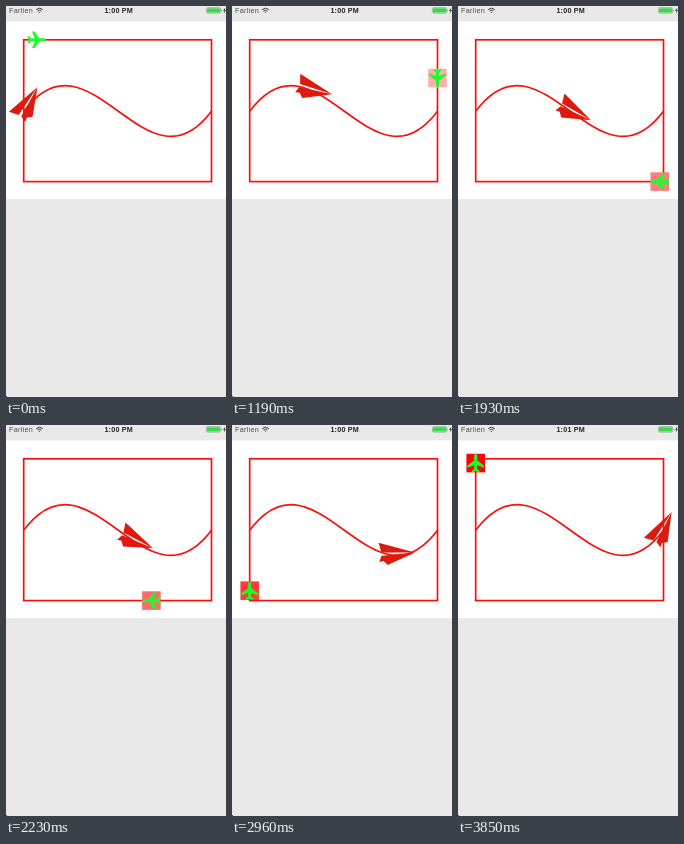
An HTML page for the animation above (3.99 s loop, 220 px wide and 391 px high).

```html
<!DOCTYPE html>
<html lang="en">
<head>
<meta charset="utf-8">
<title>Planes on paths</title>
<style>
html, body { margin: 0; width: 100%; height: 100%; overflow: hidden; background: #e9e9e9; }
svg { display: block; width: 100vw; height: 100vh; }
text { font-family: "Liberation Sans", Arial, sans-serif; font-size: 7.2px; }
</style>
</head>
<body>
<svg viewBox="0 0 220 391">
  <rect width="220" height="391" fill="#e9e9e9"/>
  <rect y="15.5" width="220" height="177.5" fill="#fff"/>

  <text x="3" y="7.1" fill="#4a4a4a" letter-spacing=".3">Farlien</text>
  <g fill="none" stroke="#333" stroke-width="1">
    <path d="M30.2 3.6Q33.5 .8 36.8 3.6M31.6 5.1Q33.5 3.6 35.4 5.1"/>
    <circle cx="33.5" cy="6.4" r=".5" fill="#333" stroke="none"/>
  </g>
  <text id="clock" x="112.7" y="7.1" fill="#222" font-weight="bold" letter-spacing=".2" text-anchor="middle">1:00 PM</text>
  <rect x="200.4" y="1.6" width="14.2" height="5.6" rx="1.4" fill="#e9e9e9" stroke="#62ad6c" stroke-width=".6"/>
  <rect x="201" y="2.2" width="13" height="4.4" rx=".9" fill="#3fd34f"/>
  <path d="M215.2 3.4v2q.9-.2.9-1t-.9-1" fill="#62ad6c"/>
  <path d="M219.3 1.8L217 4.8h1.4L218 7.2l2-3h-1.2z" fill="#333"/>
  <rect y="390" width="1" height="1" fill="#555"/>

  <g fill="none" stroke="#f8100c" stroke-width="1.7">
    <rect id="frame"/>
    <path id="wave"/>
  </g>
  <g id="paper" fill="#dc1b0e">
    <path d="M21.5-4.8L-15.8-11L-12-1.5z"/>
    <path d="M21.5-4.8L-4.5 10.4L-9 6.6L-13.2 8.1L-11.6 1.6z"/>
  </g>
  <g id="jet">
    <rect id="tile" x="-9.3" y="-9.3" width="18.6" height="18.6"/>
    <path fill="#1cfb2b" d="M9.2 0C9.2-1 7.6-1.6 6-1.6H2.5L-2.5-8.3H-4.8L-2.2-1.6L-5.8-1.4L-7.6-3.8H-9.2L-8.2 0L-9.2 3.8H-7.6L-5.8 1.4L-2.2 1.6L-4.8 8.3H-2.5L2.5 1.6H6C7.6 1.6 9.2 1 9.2 0z"/>
  </g>
</svg>
<script>
const el = id => document.getElementById(id);
const box = { x: 17.7, y: 33.8, w: 187.8, h: 141.8 };
const corners = [[0, 0], [1, 0], [1, 1], [0, 1], [0, 0]]
  .map(([u, v]) => [box.x + u * box.w, box.y + v * box.h]);
const curve = [[18, 105], [84, 17], [140, 193], [205.7, 105]];

const LOOP = 3990;
const shortTicks = [7, 12, 15, 19, 23, 26];
const starts = Array.from({ length: 27 }, (_, k) =>
  150 * k - 10 * shortTicks.filter(s => s < k).length);

for (const [name, value] of Object.entries({ x: box.x, y: box.y, width: box.w, height: box.h }))
  el("frame").setAttribute(name, value);
el("wave").setAttribute("d", `M${curve[0]}C${curve.slice(1).join(" ")}`);

const mix = (a, b, t) => a + (b - a) * t;
const mixPoint = (p, q, t) => [mix(p[0], q[0], t), mix(p[1], q[1], t)];

// Point and tangent on a polyline's control points (de Casteljau).
function bezier(points, t) {
  let p = points;
  while (p.length > 2) p = p.slice(1).map((q, i) => mixPoint(p[i], q, t));
  const angle = Math.atan2(p[1][1] - p[0][1], p[1][0] - p[0][0]) * 180 / Math.PI;
  return [...mixPoint(p[0], p[1], t), angle];
}

function place(id, [x, y, angle]) {
  el(id).setAttribute("transform", `translate(${x} ${y}) rotate(${angle})`);
}

function tileColor(p) {
  if (p < 0.05) return "none";
  if (p < 0.19) return "#e7e7e7";
  const c = Math.round(255 * (1 - p));
  return `rgb(255,${c},${c})`;
}

function draw(ms) {
  const tick = starts.findLastIndex(s => s <= ms);
  const p = (0.07 + 0.15 * tick) / 4;
  const side = Math.min(3, Math.floor(p * 4));
  place("jet", bezier(corners.slice(side, side + 2), p * 4 - side));
  place("paper", bezier(curve, p));
  el("tile").setAttribute("fill", tileColor(p));
  el("clock").textContent = tick < 22 ? "1:00 PM" : "1:01 PM";
}

const begin = performance.now();
function run() {
  draw((performance.now() - begin) % LOOP);
  requestAnimationFrame(run);
}
run();
</script>
</body>
</html>
```
